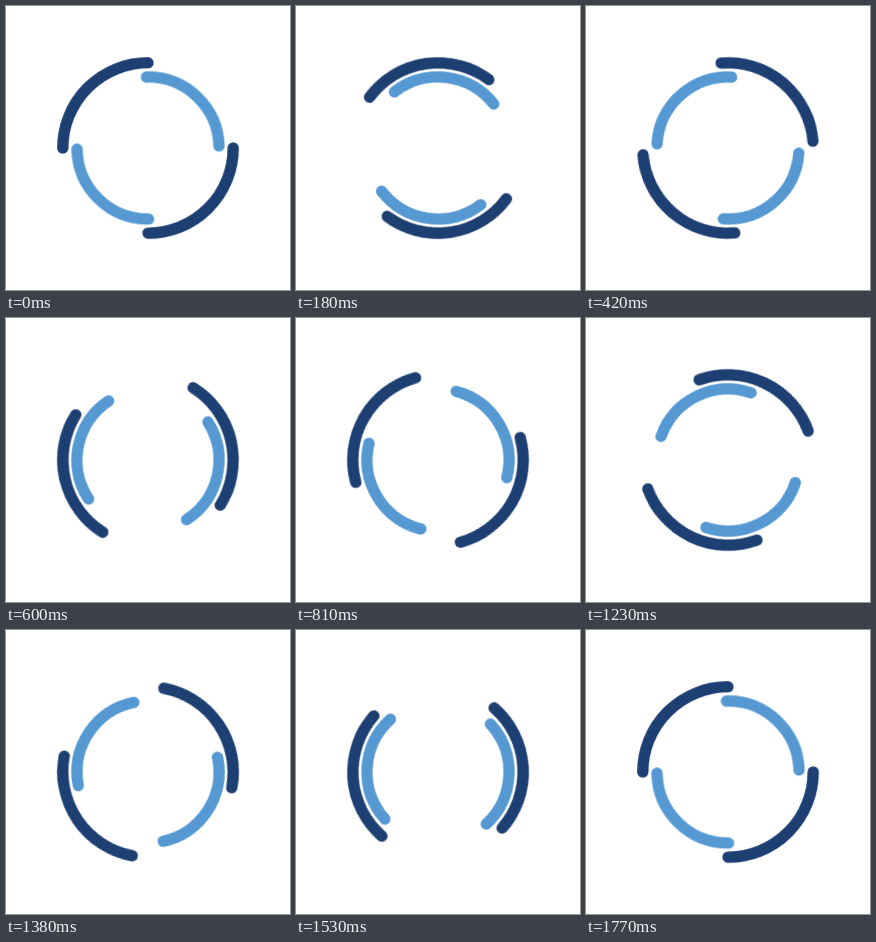
An HTML page that plays this animation: 284 px wide and 284 px high, repeating every 1.8 s.

```html
<!DOCTYPE html>
<html lang="en">
<head>
<meta charset="utf-8">
<title>Double ring spinner</title>
<style>
  html, body {
    margin: 0;
    width: 100%;
    height: 100%;
    overflow: hidden;
    background: #fff;
  }
  svg {
    display: block;
    width: 100%;
    height: 100%;
  }
  circle {
    fill: none;
    stroke-width: 4;
    stroke-linecap: round;
    stroke-dasharray: 1 1; /* four quarters, see pathLength */
    transform-origin: 50px 50px;
    /* 60 poses, the first and last both upright; 1ms lead keeps step edges clean */
    animation: spin 1800ms steps(60, jump-none) -1ms infinite;
  }
  .outer { stroke: #1d3f72; }
  .inner {
    stroke: #5699d2;
    stroke-dashoffset: 1;
    animation-direction: reverse;
  }
  @keyframes spin {
    from { transform: rotate(0deg); }
    to { transform: rotate(360deg); }
  }
</style>
</head>
<body>
<svg viewBox="0 0 100 100" aria-hidden="true">
  <circle class="outer" cx="50" cy="50" r="30" pathLength="4"/>
  <circle class="inner" cx="50" cy="50" r="25" pathLength="4"/>
</svg>
</body>
</html>
```
